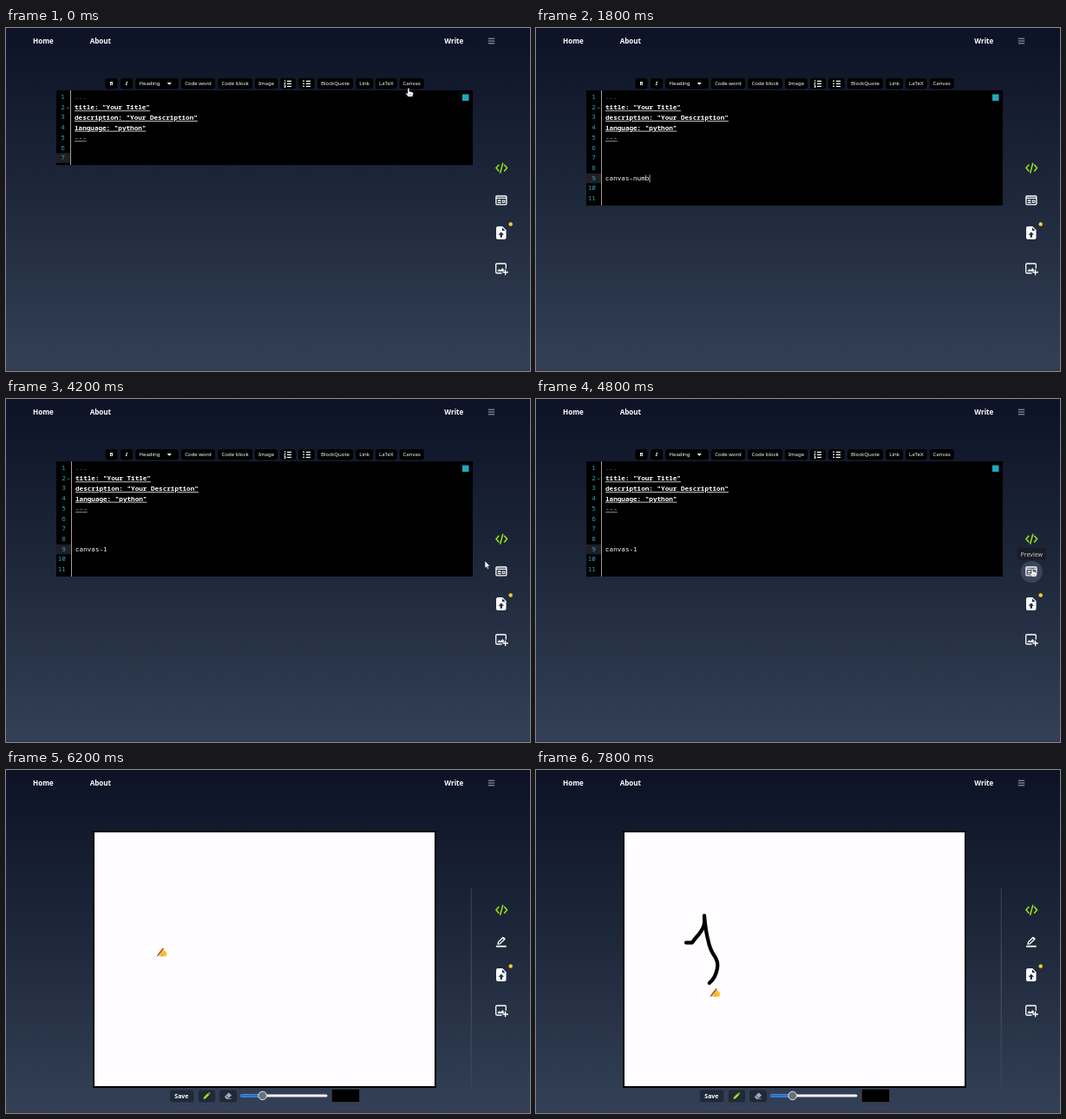
These frames come from a looping animation (604 px wide and 396 px high, 8000 ms). An HTML page:

```html
<!DOCTYPE html>
<html lang="en">
<head>
<meta charset="utf-8">
<title>Markdown editor with canvas</title>
<style>
html, body { margin: 0; width: 604px; height: 396px; overflow: hidden; background: #0d1226; }
svg { display: block; }
text { font-family: "Noto Sans", "Open Sans", sans-serif; fill: #fff; white-space: pre; }
.nav { font-size: 8.05px; font-weight: 700; }
.btn { font-size: 6.05px; text-anchor: middle; }
.tip { font-size: 7.05px; text-anchor: middle; fill: #c6c8cd; }
.mono { font-family: "Noto Sans Mono", "DejaVu Sans Mono", monospace; font-size: 7.64px; }
.meta { font-weight: 700; text-decoration: underline; }
.num { fill: #2ba9c4; text-anchor: end; }
.line { fill: none; stroke: #fff; stroke-width: 1.3; }
</style>
</head>
<body>
<svg width="604" height="396" viewBox="0 0 604 396">
  <defs>
    <linearGradient id="sky" x2="0" y2="1">
      <stop stop-color="#0d1226"/><stop offset=".5" stop-color="#1e283b"/><stop offset="1" stop-color="#334056"/>
    </linearGradient>
    <linearGradient id="rule" x2="0" y2="1">
      <stop stop-color="#3a4355"/><stop offset=".5" stop-color="#4a5466"/><stop offset="1" stop-color="#3a4559"/>
    </linearGradient>
  </defs>
  <rect width="604" height="396" fill="url(#sky)"/>
  <rect y="394" width="604" height="2" fill="#35384e"/>

  <g class="nav">
    <text x="31" y="17.7">Home</text>
    <text x="96.7" y="17.7">About</text>
    <text x="505.3" y="17.7">Write</text>
  </g>
  <path d="M555.8 12.2h7.4m-7.4 2.8h7.4m-7.4 2.8h7.4" stroke="#b9bcc5" stroke-width=".9"/>

  <g id="editor">
    <g id="toolbar"></g>
    <path d="M185.700 63l2.600 2.800 2.600-2.800z" fill="#fff"/>
    <path class="line" d="M324 61.300h5m-5 3h5m-5 3h5M346 61.300h5m-5 3h5m-5 3h5"/>
    <path class="line" style="stroke-width:.8" d="M320.800 60.400h1v2.200m-1.200 1h1.500l-1.500 1.600h1.600m-1.600 1.300h1.500v2h-1.500m.5-1h1"/>
    <path d="M342.300 60.600h1.500v1.500h-1.500zm0 3h1.500v1.500h-1.500zm0 3h1.500v1.500h-1.500z" fill="#fff"/>
    <rect id="page" x="58" y="72" width="480"/>
    <rect id="active" x="58" height="11.500" fill="#1f2026"/>
    <g id="doc">
      <rect id="gutter" x="74" y="72" width="1" fill="#a3a19c"/>
      <path d="M69.900 91.600l1.300 1.500 1.300-1.500" fill="none" stroke="#2ba9c4" stroke-width=".7"/>
      <g id="lines"></g>
      <text id="typed" class="mono" x="79"/>
    </g>
    <rect id="caret" y="169.500" width=".9" height="8.700" fill="#9fd6e0"/>
    <rect x="526" y="76.500" width="7.500" height="7.500" fill="#1fa9bd"/>
  </g>

  <g id="preview">
    <rect x="101" y="71" width="394" height="295" fill="#fffdff" stroke="#000" stroke-width="2"/>
    <rect x="535.700" y="136" width="1" height="234" fill="url(#rule)"/>
    <g fill="#1f293a" stroke="#3d4657" stroke-width=".7">
      <rect x="188.400" y="369" width="28.600" height="15" rx="3"/>
      <rect x="221.300" y="369" width="20.400" height="15" rx="3"/>
      <rect x="245.800" y="369" width="20.800" height="15" rx="3"/>
    </g>
    <text x="202.400" y="379.200" font-size="7" font-weight="600" text-anchor="middle">Save</text>
    <path d="M227.500 380l.5-2.300 4.500-4.500 1.800 1.800-4.500 4.500zM233 372.600l.8-.7 1.800 1.800-.8.7z" fill="#98e817"/>
    <path d="M252.300 377.200l4.400-4.400 3 2.800-4 4h-1.600zM255.700 379.600h4" fill="#a9adb6" stroke="#a9adb6" stroke-width=".7"/>
    <path d="M254 376l2.400 2.600" stroke="#1f293a" stroke-width=".8"/>
    <rect x="270" y="374.400" width="100.500" height="3.200" rx="1.600" fill="#f1f1f3"/>
    <rect x="270" y="374.400" width="26" height="3.200" rx="1.600" fill="#1671dd"/>
    <circle cx="295.700" cy="376" r="4.800" fill="#6a7078" stroke="#e6e8ec"/>
    <rect x="375.200" y="368.200" width="32.600" height="15.600" stroke="#4c4c52" stroke-width=".8"/>
    <path id="ink" fill="none" stroke="#000" stroke-width="4.200" stroke-linecap="round" stroke-linejoin="round"
      d="M173 199.300H180Q183 195 187 190.500Q193.500 183 194.200 176L194 168Q195.500 186 198.500 197Q200.500 207 205 213.500Q210.500 221 209 229Q207 240 199.800 246"/>
  </g>

  <circle id="halo" cx="571.200" cy="199.500" r="12.600" fill="#3b4558"/>
  <path class="line" style="stroke:#98e817;stroke-width:1.500" d="M568.300 157.800l-3.300 3.800 3.300 3.800M574.200 157.800l3.300 3.800-3.300 3.800M572.800 155.800l-3.200 11.800"/>
  <g id="viewIcon" class="line">
    <rect x="564.900" y="194" width="12" height="9.800" rx="1"/>
    <path d="M565 196.400h12M566.800 199h3.700m-3.700 2.500h3.700" />
    <rect x="572.300" y="199" width="2.600" height="2.400" stroke-width="1"/>
  </g>
  <g id="editIcon">
    <path class="line" d="M567 201l.4-2.300 5.300-5.200 1.900 1.900-5.300 5.300z" stroke-width="1.200"/>
    <path d="M572.300 193.900l1.300-1.200 2.100 2.100-1.300 1.200zM565 202.700h11.700v1.900H565z" fill="#fff"/>
  </g>
  <path d="M565 231q0-2 2-2h5.300l4.200 4.300v8.700q0 1.900-2 1.900H567q-2 0-2-1.900z" fill="#fff"/>
  <path d="M571.900 230.200v3.700h3.600M570.800 235.500l3.200 3.300h-2v2.900h-2.400v-2.900h-2z" fill="#202b3e"/>
  <circle cx="581.700" cy="226.500" r="2.200" fill="#f5cf24"/>
  <path class="line" d="M576.300 277.800v-4.600q0-1.200-1.200-1.200h-9.200q-1.200 0-1.200 1.200v8.600q0 1.200 1.200 1.200h5.600M575.600 278.800v6.400M572.400 282h6.400"/>
  <path d="M566.300 281l2.200-3 1.600 1.800 2.200-2.900 2.400 3.300-2.600.8z" fill="#fff"/>

  <g id="tip">
    <rect id="tipBox" height="14.400" rx="2" fill="#1a1d25"/>
    <text id="tipText" class="tip" x="571.300"/>
  </g>

  <g id="hand">
    <path d="M-1 1Q0-.6 1 1V4.200L4.500 5Q5.700 5.400 5.500 6.800L4.600 10.300H-.6L-3.200 6.700Q-3 5.300-1 6.600z" fill="#fff" stroke="#222" stroke-width=".6"/>
    <path d="M1.100 7v2m1.400-2v2" stroke="#555" stroke-width=".4"/>
  </g>
  <path id="arrow" d="M0 0V8.500L2 6.800 3.300 9.600 4.700 9 3.400 6.200H6z" fill="#fff" stroke="#222" stroke-width=".6"/>
  <path id="beam" d="M-1.500-4h3M0-4v8M-1.500 4h3" fill="none" stroke="#ddd" stroke-width=".8"/>
  <g id="pen">
    <path d="M2.500 11.500L6 8.700 9 8.300 12 11.500 11.500 15 8 15.800 2.500 14.800 5.500 13.300 3 12.800z" fill="#f9c435"/>
    <path d="M5.500 13.300L8.500 12.300M2.500 14.800l4.500-.3" stroke="#d08a1f" stroke-width=".6"/>
    <path d="M1.600 14.200L8 6.200" stroke="#b4532f" stroke-width="1.700"/>
    <path d="M.7 15.500L2 13.800" stroke="#333" stroke-width=".9"/>
  </g>
</svg>
<script>
const LOOP = 8000, STEP = 200, ROW = 11.68, CHAR = 4.584;
const $ = id => document.getElementById(id);
const show = (id, on) => { $(id).style.display = on ? "" : "none"; };
const set = (id, attrs) => { for (const k in attrs) $(id).setAttribute(k, attrs[k]); };
const clamp = v => Math.min(1, Math.max(0, v));
const ease = v => { v = clamp(v); return v * v * (3 - 2 * v); };
const mix = (a, b, p) => a.map((v, i) => v + (b[i] - v) * p);

// label, left, right, optional text centre
const buttons = [
  ["B", 114.5, 128.5], ["I", 132, 146], ["Heading", 149.3, 198.7, 165.5],
  ["Code word", 202, 241], ["Code block", 244.3, 284], ["Image", 287, 313],
  ["", 316, 334], ["", 337, 355.5], ["BlockQuote", 359, 400],
  ["Link", 403.3, 423], ["LaTeX", 426, 450.5], ["Canvas", 453.7, 481.7]
];
const looks = { B: 'font-weight="700" font-size="7"', I: 'font-style="italic" font-weight="600" font-size="7"' };
$("toolbar").innerHTML = buttons.map(([label, l, r, mid = (l + r) / 2]) =>
  `<rect x="${l}" y="58" width="${r - l}" height="12.300" rx="3"/>
   <text class="btn" x="${mid}" y="66.400" ${looks[label] || ""}>${label}</text>`).join("");

const source = ["---", 'title: "Your Title"', 'description: "Your Description"', 'language: "python"', "---"];
const styles = ['fill="#2a5a82"', 'class="mono meta"', 'class="mono meta"', 'class="mono meta"',
  'style="fill:#a9bcc9;text-decoration:underline"'];
styles[0] = 'style="fill:#2a5a82"';
$("lines").innerHTML = Array.from({ length: 11 }, (_, i) =>
  `<text class="mono num" x="67.800" y="${82.1 + i * ROW}">${i + 1}</text>` +
  (source[i] ? `<text class="mono" ${styles[i].replace('class="mono meta"', 'style="font-weight:700;text-decoration:underline"')}
    x="79" y="${82.7 + i * ROW}">${source[i]}</text>` : "")).join("");
const numbers = [...document.querySelectorAll(".num")];
const inkLength = $("ink").getTotalLength();

function typedText(t) {
  if (t < 400) return "";
  if (t >= 2800) return "canvas-1";
  const erased = Math.max(0, Math.min(6, (t - 1400) / STEP));
  return "canvas-number".slice(0, 13 - erased);
}

function drawEditor(t) {
  const inserted = t >= 400, rows = inserted ? 11 : 7, shift = inserted ? 1 : 0;
  const height = inserted ? 133 : 86.2, text = typedText(t);
  set("page", { height });
  set("gutter", { height });
  set("doc", { transform: `translate(${shift})` });
  set("active", { y: inserted ? 167.8 : 144.3, width: 16 + shift });
  numbers.forEach((n, i) => n.style.display = i < rows ? "" : "none");
  $("typed").textContent = text;
  set("typed", { y: 82.7 + 8 * ROW });
  set("caret", { x: 79.2 + text.length * CHAR + shift });
  show("caret", inserted && t < 3600);
}

function drawInk(t) {
  const length = inkLength * clamp((t - 6800) / 1000);
  show("ink", length > 0);
  set("ink", { "stroke-dasharray": `${length} ${inkLength + 9}` });
  return $("ink").getPointAtLength(length);
}

function pointer(t, ink) {
  if (t < 800) return ["hand", ...mix([464, 69], [461.5, 70], clamp(t / 600))];
  if (t < 1600) return ["beam", ...mix([458, 92], [150, 174], ease((t - 800) / 400))];
  if (t < 4000) return [];
  if (t < 5200) return [t < 4600 ? "arrow" : "hand", ...mix([545, 184], [572, 195], ease((t - 4000) / 600))];
  if (t < 6200) {
    const [x, y] = mix([572, 195], [174, 200], ease((t - 5200) / 1000));
    return [x > 558 ? "hand" : x > 496 ? "arrow" : "pen", x, y];
  }
  return ["pen", ink.x + .5, ink.y + .3];
}

function drawTip(t, editing) {
  const wide = editing ? 33 : 59;
  set("tipBox", { x: 571.3 - wide / 2, y: editing ? 171.700 : 170.600, width: wide });
  set("tipText", { y: editing ? 181.700 : 180.700 });
  $("tipText").textContent = editing ? "Preview" : "Edit Markdown";
  $("tip").style.opacity = t < 4600 ? 0 : t < 4800 ? .5 : clamp((5600 - t) / 200);
}

function draw(now) {
  const t = Math.floor(now % LOOP / STEP) * STEP;
  const editing = t < 5000;
  show("editor", editing);
  show("viewIcon", editing);
  show("preview", !editing);
  show("editIcon", !editing);
  show("halo", t >= 4600 && t < 5600);
  drawEditor(t);
  drawTip(t, editing);
  const [kind, x, y] = pointer(t, drawInk(t));
  for (const id of ["hand", "arrow", "beam", "pen"]) show(id, id === kind);
  if (kind) set(kind, { transform: `translate(${x} ${y})` });
  requestAnimationFrame(draw);
}
draw(performance.now());
</script>
</body>
</html>
```
